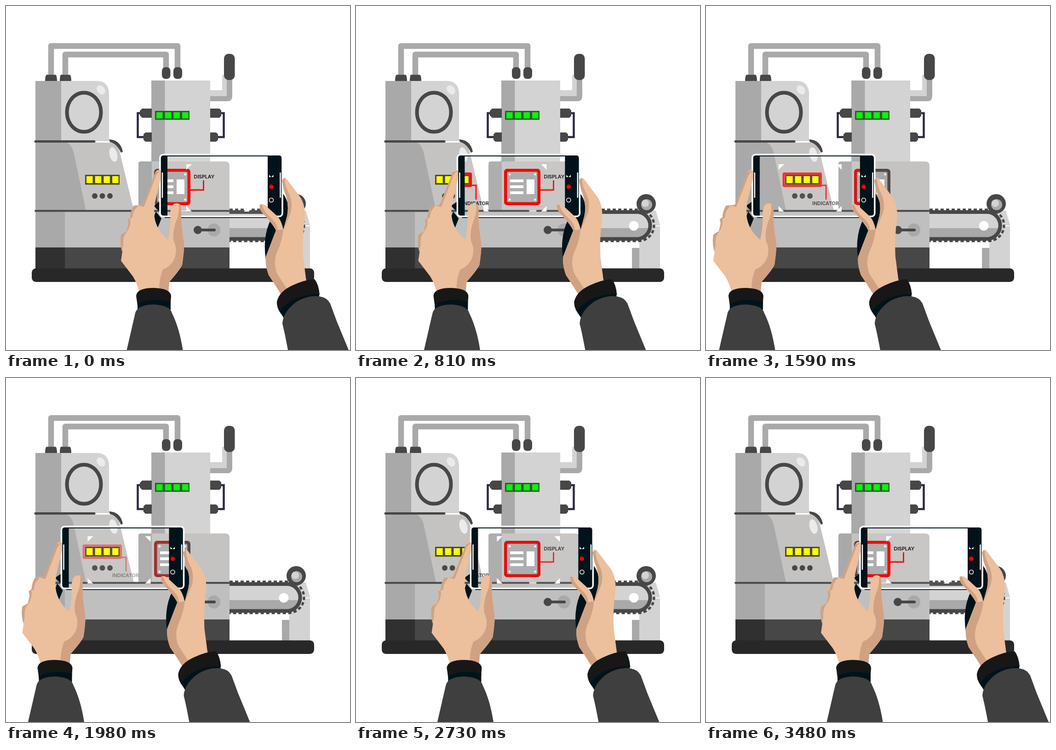
Animation of 748x748 px, one loop 3510 ms. Source, as an HTML page:

```html
<!DOCTYPE html>
<html lang="en">
<head>
<meta charset="utf-8">
<title>Machine seen through a phone</title>
<style>
html, body { margin: 0; width: 100%; height: 100%; overflow: hidden; background: #fff; }
svg { display: block; width: 748px; height: 748px; }
text { font: 600 10.6px Inter, sans-serif; fill: #111; }
.line { fill: none; }
.dark { fill: #474747; }
.mid { fill: #a9a9a9; }
.light { fill: #d3d3d3; }
.panel { fill: #c4c3c1; }
.shine { fill: #ebebeb; }
.ink { fill: #00131a; }
.skin { fill: #ecbf9d; }
.shade { fill: #d0a283; }
.cuff { fill: #171717; }
.sleeve { fill: #3f3f3f; }
.white { fill: #fff; }
</style>
</head>
<body>
<svg viewBox="0 0 748 748">
  <defs>
    <clipPath id="view"><rect id="window" x="351" y="327" width="218" height="128"/></clipPath>
  </defs>

  <g id="machine">
    <!-- pipes -->
    <path class="line" stroke="#a9a9a9" stroke-width="12.500" stroke-linejoin="round" d="M98 155V87H373V140M129 155V105.500H348V140"/>
    <path class="dark" d="M88 149.500h20q3 2 3 15h-26q0-13 3-15zM119 149.500h20q3 2 3 15h-25q0-13 2-15z"/>
    <rect class="dark" x="339" y="133" width="18.500" height="25.500" rx="8"/>
    <rect class="dark" x="364" y="133" width="19" height="25.500" rx="8"/>

    <!-- left tower -->
    <path class="light" d="M64 163H197Q224 163 224 192V294H64z"/>
    <path class="mid" d="M64 163H120V294H64z"/>
    <ellipse class="shine" cx="206.500" cy="182.500" rx="8" ry="11" transform="rotate(-40 206.500 182.500)"/>
    <ellipse class="line" cx="169.500" cy="231" rx="37" ry="42.500" stroke="#474747" stroke-width="8"/>
    <path class="mid" d="M64 296H180V446H64z"/>
    <path class="panel" d="M133 297H225Q242 298 247 316L278 445H174L147 318Q143 303 133 297z"/>
    <ellipse class="shine" cx="233.500" cy="323" rx="8.500" ry="16" transform="rotate(-14 233.500 323)"/>
    <path class="line" stroke="#474747" stroke-width="5" stroke-linecap="round" d="M64 294.500H192"/>
    <path class="dark" d="M224 290Q249 291 254 317L250 319Q241 299 226 296z"/>
    <path class="dark" d="M172 367h75v21.500h-75z"/>
    <g class="dark"><circle cx="193" cy="413" r="6"/><circle cx="209.500" cy="413" r="6"/><circle cx="226" cy="413" r="6"/></g>

    <!-- column -->
    <path class="light" d="M316 162H444V340H316z"/>
    <path class="mid" d="M316 162H345.500V340H316z"/>
    <path class="dark" d="M324 228h75v19.500h-75z"/>
    <path class="line" stroke="#2b2b42" stroke-width="4.500" d="M294 233H286.500V285H301M466 233H473.500V285H459"/>
    <path class="dark" d="M317 223H296L291 228V238L296 243H317zM317 275H303L299 279V291L303 295H317zM444 223H464L468 227V239L464 243H444zM444 275H457L461 279V291L457 295H444z"/>
    <path class="mid" d="M444 183H480V150H492V195Q492 207 482 207H444z"/>
    <path class="light" d="M444 183H470V150H480V196H444z"/>
    <rect class="dark" x="474" y="104" width="23.500" height="57" rx="10"/>

    <!-- conveyor -->
    <path class="light" d="M616 500L630 445H652L661 476V573H616z"/>
    <path class="mid" d="M600 526H616V573H600z"/>
    <path class="line" stroke="#fff" stroke-width="2" d="M646 478H662"/>
    <path class="line" stroke="#474747" stroke-width="5" stroke-dasharray="7 5" d="M486 443H614A34 34 0 0 1 614 511H486"/>
    <path class="light" d="M486 447H614A30 30 0 0 1 614 507H486z"/>
    <path class="mid" d="M486 483H643Q636 507 614 507H486z"/>
    <path class="line" stroke="#474747" stroke-width="8" d="M486 448H614A29.500 29.500 0 0 1 614 506.500H486"/>
    <circle class="white" cx="604" cy="478" r="10.500"/>
    <circle class="dark" cx="631" cy="430" r="21"/>
    <circle class="mid" cx="632" cy="432" r="12"/>
    <circle class="light" cx="629" cy="429" r="8"/>

    <!-- base -->
    <path fill="#bfbfbf" d="M64 446H486V526H64z"/>
    <path class="mid" d="M64 446H128V526H64z"/>
    <path class="dark" d="M64 525H486V573H64z"/>
    <path fill="#303030" d="M64 525H128V573H64z"/>
    <rect fill="#282828" x="56" y="570.500" width="614" height="29.500" rx="9"/>
    <circle class="mid" cx="452" cy="487" r="14"/>
    <circle class="dark" cx="417" cy="487" r="9"/>
    <path class="line" stroke="#474747" stroke-width="6" stroke-linecap="round" d="M417 487H453"/>

    <!-- display unit -->
    <path class="panel" d="M288 445V343Q288 338 294 338H477Q486 338 486 348V445z"/>
    <path class="mid" d="M288 445V343Q288 338 294 338H317V445z"/>
    <path class="line" stroke="#474747" stroke-width="4" stroke-linecap="round" d="M64 445.500H375M394 445.500H485"/>
    <rect fill="#534748" x="322" y="354" width="79" height="79" rx="7"/>
    <rect class="mid" x="328.500" y="360.500" width="66" height="66" rx="3"/>
    <path class="white" d="M335 377h29v6h-29zM335 390h29v6h-29zM335 403h29v6h-29zM371 377h17v32h-17z"/>
    <g class="shine"><circle cx="334" cy="366" r="2.500"/><circle cx="389.500" cy="366" r="2.500"/><circle cx="334" cy="421" r="2.500"/><circle cx="389.500" cy="421" r="2.500"/></g>
  </g>

  <!-- what the phone adds to its view -->
  <g clip-path="url(#view)">
    <path fill="#fff" opacity=".06" d="M0 320H748V460H0z"/>
    <g id="labels">
      <g class="line" stroke="#f00">
        <rect x="325" y="357" width="73" height="73" rx="4" stroke-width="6"/>
        <rect x="169" y="364.500" width="80.500" height="26.500" rx="1" stroke-width="5"/>
        <path stroke-width="2.800" d="M400 400H429.500V379M249 390H261V421"/>
      </g>
      <text x="408.500" y="374.500">DISPLAY</text>
      <text x="231" y="433">INDICATOR</text>
    </g>
  </g>

  <g id="phone">
    <path class="ink" d="M346 417L322 434Q325 441 336 447L350 440zM326 447Q320 459 321 472L330 482L338 462zM577 462Q557 500 565 552L606 500L614 465Q618 425 600 405L585 430V455z"/>

    <path class="white" d="M392 344h12l-12 12zM529 344v12l-12-12zM392 447v-12l12 12zM529 447h-12l12-12z"/>
    <path class="ink" d="M351 325V457H342Q336 457 336 451V331Q336 325 342 325zM569 325H594Q600 325 600 331V451Q600 457 594 457H569z"/>
    <path class="line" stroke="#00131a" stroke-width="1.800" d="M340 326H596M345 460H592"/>
    <rect class="line" x="335" y="323" width="266" height="134.500" rx="7" stroke="#fff" stroke-width="3.500"/>
    <path class="line" stroke="#fff" stroke-width="2.500" stroke-linecap="round" d="M340 363V416M596.500 363V416"/>
    <path class="white" d="M572 367l4.500 5h-4.500zM581.500 367v5h-4.500z"/>
    <circle fill="#f00" cx="577" cy="393" r="4.700"/>
    <circle class="line" cx="577" cy="422" r="4.500" stroke="#fff" stroke-width="1.500"/>

    <!-- left hand -->
    <path class="skin" d="M325 361Q330 354 336 358Q338 372 334 385L324 427Q320 450 324 465Q330 490 352 508Q359 480 357 452Q358 434 366 430Q374 427 379 432Q382 440 381 460Q381 480 387 515Q388 530 383 563Q378 574 355 600L353 625H290Q287 606 276 588L250 554L253 534Q247 515 250 497L262 490L266 473L264 463L270 459Q271 444 278 434L297 432z"/>
    <path class="shade" d="M379 432Q382 440 381 460Q381 480 387 515Q388 530 383 563Q378 574 355 600L353 622H333Q332 596 341 573Q358 567 366 550Q374 530 365 512Q361 495 369 470Q378 450 376 431zM325 361L336 358Q328 363 325 372L300 437L288 434L297 432zM278 434L288 434Q276 444 275 460L264 466L270 459Q271 444 278 434zM264 463L270 464Q272 478 262 492Q254 500 255 520L252 534Q247 515 250 497L262 490L266 473z"/>
    <path class="cuff" d="M283 630Q285 613 321 613Q357 614 359 630L357 659H287z"/>
    <path class="ink" d="M286 648Q320 633 358 643V661H286z"/>
    <path class="sleeve" d="M262.500 748L281 668Q285 650 321 649Q357 651 361 668Q377 700 384.500 748z"/>

    <!-- right hand -->
    <path class="skin" d="M600 379Q604 370 610 376L638 413Q651 430 650 460Q644 500 646 545L654 606L601 632Q588 610 571 585Q563 562 565 545L587 488Q579 472 556 448Q550 438 552 432Q559 428 568 437L592 459Q600 470 603 486L611 457Q617 430 604 400z"/>
    <path class="shade" d="M552 432Q554 431 557 433Q560 446 575 460Q592 474 590 487L603 486Q601 510 589 536Q580 560 590 583L612 617L601 632Q588 610 571 585Q563 562 565 545L587 488Q579 472 556 448Q550 438 552 432zM600 379L606 374Q606 392 617 412Q624 430 619 450L603 487L611 457Q617 430 604 400z"/>
    <path class="cuff" d="M589 643Q594 620 624 607Q650 595 671 594Q680 605 682 628Q640 630 604 676Q588 660 589 643z"/>
    <path class="ink" d="M595 664Q620 628 681 626V640L605 680z"/>
    <path class="sleeve" d="M601 691Q602 665 632 643Q660 627 684 632Q698 634 705 647L719 685L745 748H613Q606 710 601 691z"/>
  </g>
</svg>
<script>
const LOOP = 3510, STEP = 30, TURN = 1647, BACK = 3478, TRAVEL = 235, PULSE = 870;
const $ = id => document.getElementById(id);

function addLights(x, y, height, color) {
  for (let i = 0; i < 4; i++) {
    $('machine').insertAdjacentHTML('beforeend',
      `<rect x="${x + i * 18.7}" y="${y}" width="13.5" height="${height}" fill="${color}"/>`);
  }
}
addLights(175, 370, 15, '#ff0');
addLights(327, 231, 13.5, '#0f0');

function ease(u) {
  u = Math.min(1, Math.max(0, u));
  return u * u * (3 - 2 * u);
}

function draw(now) {
  const t = Math.floor(now % LOOP / STEP) * STEP;
  const progress = t < TURN ? ease(t / TURN) : 1 - ease((t - TURN) / (BACK - TURN));
  const shift = -TRAVEL * progress;
  $('phone').setAttribute('transform', `translate(${shift})`);
  $('window').setAttribute('x', 351 + shift);
  $('labels').setAttribute('opacity', (1 + Math.cos(2 * Math.PI * t / PULSE)) / 2);
}

const start = performance.now();
function tick() {
  draw(performance.now() - start);
  requestAnimationFrame(tick);
}
tick();
</script>
</body>
</html>
```
